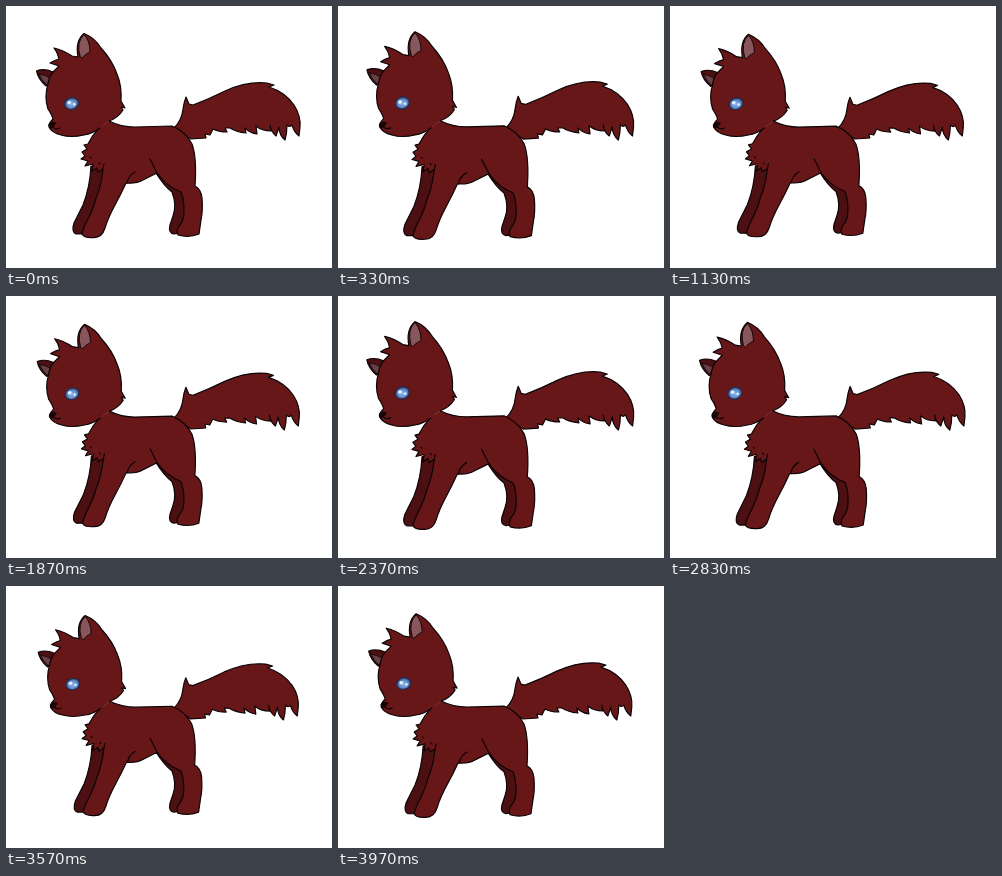
An HTML page for the animation above (4.01 s loop, 326x262 px).

```html
<!DOCTYPE html>
<html>
<head>
<meta charset="utf-8">
<style>
  html, body { margin: 0; width: 100%; height: 100%; overflow: hidden; background: #fff; }
  svg { display: block; width: 326px; height: 262px; }
  .fur { fill: #681719; }
  .shade { fill: #4d1012; }
  .line { fill: none; }
  #wolf { stroke: #0c0304; stroke-width: 1.2; stroke-linejoin: round; stroke-linecap: round; }
</style>
</head>
<body>
<svg viewBox="0 0 326 262">
  <defs>
    <radialGradient id="iris" cx=".5" cy=".55" r=".55">
      <stop offset="0" stop-color="#8fb8ea"/>
      <stop offset=".55" stop-color="#6690cf"/>
      <stop offset="1" stop-color="#33497f"/>
    </radialGradient>
  </defs>
  <g id="wolf">
    <!-- tail -->
    <path class="fur" d="M168 122Q176 114 177 103Q178 96 180 91L183 98L187 99Q203 93 219 85Q241 75 261 77L268 79L263 81Q279 86 288 99Q295 110 294 121L293 130Q288 126 286 119Q284 122 281 119Q281 127 279 134Q273 129 273 121L270 130Q265 126 264 119L265 125Q256 125 250 120L251 128Q244 127 239 122L240 127Q230 126 224 122L219 122L221 126Q212 126 207 123L204 129L199 128L200 132L185 133Z"/>
    <!-- far legs -->
    <path class="shade" d="M85 160Q84 181 77 199L68 217Q65 226 70 228L77 228L99 190V160Z"/>
    <path class="shade" d="M150 167Q158 180 166 186Q171 199 167 210L164 219Q162 227 168 228L175 227L182 190L165 168Z"/>
    <!-- body with near legs -->
    <path class="fur" d="M103 115Q115 121 129 121L166 120Q179 125 186 138Q191 152 189 180Q195 183 196 192Q197 205 195 214L193 228Q183 232 172 229Q170 225 173 220Q178 215 178 205Q178 193 175 186Q160 180 151 167Q145 170 137 174Q130 178 120 177Q115 188 109 199Q102 212 99 222Q96 232 87 231.500Q78 232 76 228Q77 222 83 211Q88 201 90 192Q95 181 97 163L92 166L91 162L86 165L87 158L79 160L82 155L75 153L79 150L76 146L81 143L78 139L82 138Q86 130 92 123"/>
    <path class="line" d="M121 177Q122 170 129 166M97 163L98 158M151 167L144 153M84 151L85 152M93 157L94 158"/>
    <!-- far ear -->
    <path class="shade" d="M47 66Q38 62 30.500 65Q32 73 40 80L45 77Z"/>
    <path d="M33 68Q39 69 44 72L41 79Q35 74 33 68Z" fill="#684148" stroke-width=".7"/>
    <!-- head, left open where it meets the neck -->
    <path class="fur" d="M94 122Q86 128 78 129Q65 132 55 129Q46 127 43 121Q42 118 47 113Q46 109 42 103Q38 91 42 78Q43 70 48 65L53 60L44 57Q49 54 53 53Q52 47 48 42Q57 44 66 50L72 51Q69 35 78 27.500Q89 32 95 42Q106 54 111 68Q116 80 115 95L119 102L115 101L117 104Q112 112 103 115"/>
    <path d="M74 50Q70 36 78 28.500Q84 35 84 46Q79 48 76 52Z" fill="#87575b" stroke-width=".9"/>
    <path d="M43 118Q46 115 50 117L47 121L44 122Z" fill="#180506" stroke-width=".7"/>
    <path class="line" d="M47 121Q49 124 54 122"/>
    <!-- eye -->
    <g transform="rotate(-15 65.500 97.500)">
      <ellipse cx="65.500" cy="97.500" rx="7" ry="5.800" fill="url(#iris)" stroke="#222a4c"/>
      <g stroke="none" fill="#e4effc">
        <ellipse cx="63.500" cy="96" rx="2" ry="1.700"/>
        <circle cx="68" cy="99" r="1.300"/>
      </g>
    </g>
  </g>
</svg>
<script>
  const wolf = document.getElementById("wolf");
  const period = 4010 / 2;

  // Two gentle breaths per loop, scaled about the stage centre.
  function draw() {
    const breath = Math.sin(2 * Math.PI * performance.now() / period);
    const sx = 1 + 0.0135 * breath, sy = 1 + 0.02 * breath;
    wolf.setAttribute("transform", `translate(163 131) scale(${sx} ${sy}) translate(-163 -131)`);
    requestAnimationFrame(draw);
  }
  draw();
</script>
</body>
</html>
```
